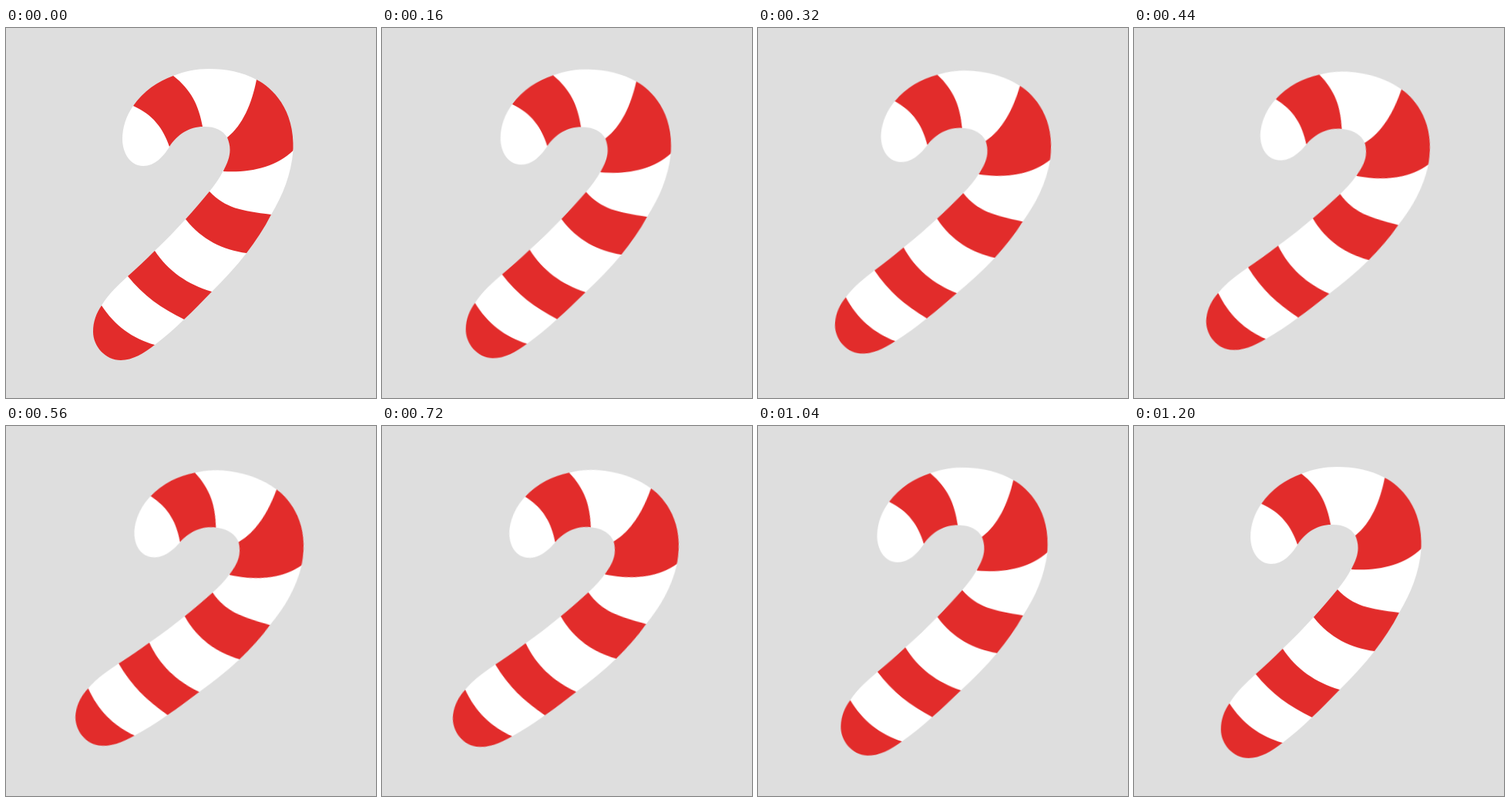
These frames come from a looping animation (480 px wide and 480 px high, 1.24 s). An HTML page:

```html
<!DOCTYPE html>
<html lang="en">
<head>
<meta charset="utf-8">
<title>Candy cane</title>
<style>
  html, body { margin: 0; width: 100%; height: 100%; overflow: hidden; background: #dedede; }
  svg { display: block; width: 100%; height: 100%; }
  #cane { transform-origin: 240px 240px; }
</style>
</head>
<body>
<svg viewBox="0 0 480 480">
  <defs>
    <clipPath id="outline">
      <path d="M151 144 C151 129 156 114 165 101 C178 82 197 69 217 62 C232 56 247 53 263 53
        C286 53 306 57 325 67 C345 77 375 105 372.5 159 C370 190 359 217 344 242
        C335 260 324 276 312 292 C298 310 283 326 267 342 C255 354 243 367 231 378
        C219 390 206 401 193 411 C179 422 164 431 149 431 C129 431 113 413 113 394
        C113 381 117 370 124 360 C133 345 146 333 158 322 C170 311 181 301 193 289
        C207 276 220 262 233 248 C244 236 254 224 264 212 C271 203 277 195 282 185
        C287 176 290.5 167 290.5 158 C290.5 152 289 147 287 142 C281 132 270 127.5 256 128
        C238 128 222 138 212 154 C204 167 193 179 178 179 C162 179 151 163 151 144Z"/>
    </clipPath>
  </defs>
  <g id="cane">
    <g clip-path="url(#outline)">
      <rect x="90" y="30" width="300" height="420" fill="#fff"/>
      <!-- stripes overshoot the outline and are clipped to it -->
      <g fill="#e22c2b">
        <path d="M165 101 C190 112 204 130 212 154 L255 128 C250 100 240 80 217 62 L180 60Z"/>
        <path d="M325 67 C319 98 307 126 287 142 L282 186 C316 188 350 181 372.5 159 L390 60Z"/>
        <path d="M264 212 C285 234 305 237 344 242 L345 290 L312 292 C282 288 254 275 233 248 L235 212Z"/>
        <path d="M193 289 C210 315 236 333 267 342 L265 378 L231 378 C202 364 178 347 158 322 L160 288Z"/>
        <path d="M124 360 C141 386 164 403 193 411 L193 450 L90 450 L90 360Z"/>
      </g>
    </g>
  </g>
</svg>
<script>
  const LOOP = 1240, PEAK = 600, SWING = 9.1;
  const easing = 'cubic-bezier(.333, 0, .667, 1)';
  const pose = (deg, ms) => ({ transform: `rotate(${deg}deg)`, offset: ms / LOOP, easing });

  document.getElementById('cane').animate(
    [pose(0, 0), pose(SWING, PEAK), pose(0, LOOP)],
    { duration: LOOP, iterations: Infinity }
  );
</script>
</body>
</html>
```
